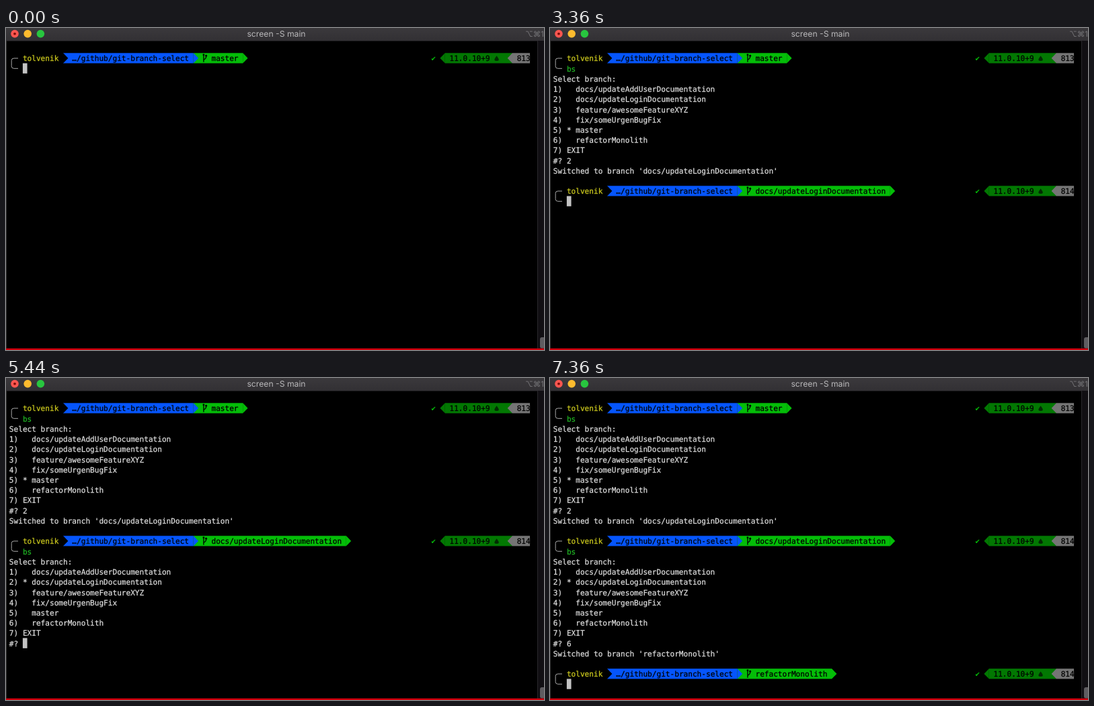
These frames come from a looping animation (800x480 px, 7.44 s). An HTML page with a canvas:

```html
<!DOCTYPE html>
<html lang="en">
<head>
<meta charset="utf-8">
<title>Branch select</title>
<style>
  html, body { margin: 0; width: 100%; height: 100%; overflow: hidden; background: #000; }
  canvas { display: block; width: 800px; height: 480px; }
</style>
</head>
<body>
<canvas id="stage" width="800" height="480"></canvas>
<script>
const ctx = document.getElementById('stage').getContext('2d');
ctx.textRendering = 'geometricPrecision';

const LOOP = 7440;
const CELL = 6.68, LINE = 15.23, LEFT = 4.85, TOP = 37.3;
const BASELINE = 12.1;
const MONO = '11.1px "DejaVu Sans Mono", monospace';
const USER = 'tolvenik';
const BRANCHES = [
  'docs/updateAddUserDocumentation',
  'docs/updateLoginDocumentation',
  'feature/awesomeFeatureXYZ',
  'fix/someUrgenBugFix',
  'master',
  'refactorMonolith'
];
const C = {
  text: '#dcdcdc', yellow: '#cbc81e', typed: '#20b424', blue: '#0555fc',
  green: '#04bd08', dark: '#027802', gray: '#757575', line: '#a8a8a8', cursor: '#c4c4c4'
};

const colX = col => LEFT + col * CELL;
const rowY = row => TOP + row * LINE;

// A hairline stroke gives the text its slightly heavier terminal weight.
function write(str, col, row, color = C.text) {
  const x = colX(col), y = rowY(row) + BASELINE;
  ctx.font = MONO;
  ctx.textAlign = 'left';
  ctx.fillStyle = ctx.strokeStyle = color;
  ctx.lineWidth = 0.25;
  ctx.fillText(str, x, y);
  ctx.strokeText(str, x, y);
}

function poly(color, points) {
  ctx.fillStyle = color;
  ctx.beginPath();
  points.forEach(([x, y]) => ctx.lineTo(x, y));
  ctx.fill();
}

function dot(color, x, y, r) {
  ctx.fillStyle = color;
  ctx.beginPath();
  ctx.arc(x, y, r, 0, Math.PI * 2);
  ctx.fill();
}

function bar(color, from, to, row) {
  ctx.fillStyle = color;
  ctx.fillRect(colX(from), rowY(row), (to - from) * CELL, LINE);
}

// Powerline separator, a little longer than its cell; dir 1 points right, -1 left.
function arrow(color, col, row, dir) {
  const base = colX(dir > 0 ? col : col + 1), y = rowY(row);
  poly(color, [[base, y], [base + dir * (CELL + 0.7), y + LINE / 2], [base, y + LINE]]);
}

function bracket(row) {
  const x = colX(0.5), end = colX(2) - 0.2;
  const y1 = rowY(row) + 7.8, y2 = y1 + LINE;
  ctx.strokeStyle = C.line;
  ctx.lineWidth = 1;
  ctx.beginPath();
  ctx.moveTo(end, y1);
  ctx.arcTo(x, y1, x, y1 + 4, 3.5);
  ctx.lineTo(x, y2 - 4);
  ctx.arcTo(x, y2, end, y2, 3.5);
  ctx.lineTo(end, y2);
  ctx.stroke();
}

function branchIcon(col, row) {
  const x = colX(col) + 1.8, y = rowY(row);
  ctx.strokeStyle = '#000';
  ctx.lineWidth = 1.3;
  ctx.beginPath();
  ctx.moveTo(x, y + 2);
  ctx.lineTo(x, y + 13.5);
  ctx.moveTo(x + 3.7, y + 4);
  ctx.lineTo(x + 3.7, y + 6);
  ctx.quadraticCurveTo(x + 3.5, y + 8.5, x, y + 10);
  ctx.stroke();
  dot('#000', x, y + 2.6, 1.4);
  dot('#000', x + 3.7, y + 4, 1.5);
}

function dropIcon(col, row) {
  const x = colX(col) + 3.3, y = rowY(row) + 4.2;
  ctx.fillStyle = '#032b03';
  ctx.beginPath();
  ctx.moveTo(x, y);
  ctx.quadraticCurveTo(x + 5.5, y + 6.5, x + 1.5, y + 7.5);
  ctx.lineTo(x - 1.5, y + 7.5);
  ctx.quadraticCurveTo(x - 5.5, y + 6.5, x, y);
  ctx.fill();
}

function prompt(row, branch, count) {
  bracket(row);
  write(USER, 3, row, C.yellow);

  const end = 46 + branch.length;
  bar(C.blue, 12, 41, row);
  arrow('#000', 12, row, 1);
  bar(C.green, 41, end, row);
  arrow(C.blue, 41, row, 1);
  arrow(C.green, end, row, 1);
  write('…/github/git-branch-select', 14, row, '#000');
  branchIcon(43, row);
  write(branch, 45, row, '#000');

  ctx.font = '9.5px "DejaVu Sans", sans-serif';
  ctx.fillStyle = C.green;
  ctx.fillText('✔', colX(94) - 1, rowY(row) + 11.7);
  arrow(C.dark, 96, row, -1);
  bar(C.dark, 97, 112, row);
  arrow(C.gray, 111, row, -1);
  bar(C.gray, 112, 115.9, row);
  write('11.0.10+9', 98, row, '#000');
  dropIcon(108, row);
  write(String(count), 113, row, '#000');
}

function menu(row, current) {
  write('Select branch:', 0, row);
  BRANCHES.forEach((name, i) => {
    write(`${i + 1}) ${name === current ? '*' : ' '} ${name}`, 0, row + i + 1);
  });
  write('7) EXIT', 0, row + 7);
  write('#?', 0, row + 8);
}

const type = (str, col, row, color) => () => write(str, col, row, color);
const switched = (row, name) => () => write(`Switched to branch '${name}'`, 0, row);
const none = () => {};

// [time, what appears, cursor column, cursor row]
const steps = [
  [0, () => prompt(0, 'master', 813), 3, 1],
  [400, type('b', 3, 1, C.typed), 4, 1],
  [520, type('s', 4, 1, C.typed), 5, 1],
  [720, none, 0, 2],
  [840, () => menu(2, 'master'), 3, 10],
  [2000, type('2', 3, 10), 4, 10],
  [2200, none, 0, 11],
  [2240, switched(11, BRANCHES[1]), 0, 12],
  [2720, () => prompt(13, BRANCHES[1], 814), 3, 14],
  [3520, type('b', 3, 14, C.typed), 4, 14],
  [3640, type('s', 4, 14, C.typed), 5, 14],
  [3840, none, 0, 15],
  [3960, () => menu(15, BRANCHES[1]), 3, 23],
  [5840, type('6', 3, 23), 4, 23],
  [6040, none, 0, 24],
  [6080, switched(24, BRANCHES[5]), 0, 25],
  [6520, () => prompt(26, BRANCHES[5], 814), 3, 27]
];

function drawWindow() {
  ctx.fillStyle = '#000';
  ctx.fillRect(0, 0, 800, 480);

  const shade = ctx.createLinearGradient(0, 0, 0, 19);
  shade.addColorStop(0, '#3b393c');
  shade.addColorStop(1, '#323034');
  ctx.fillStyle = shade;
  ctx.fillRect(0, 0, 800, 19.4);

  dot('#fc5650', 13, 8.6, 5.8);
  dot('#7c0c08', 13, 8.6, 1.9);
  dot('#fdbb2e', 32.2, 8.6, 5.8);
  dot('#28c63f', 51.4, 8.6, 5.8);

  ctx.textAlign = 'center';
  ctx.font = '12.2px Inter, sans-serif';
  ctx.fillStyle = '#b9b8ba';
  ctx.fillText('screen -S main', 402, 13);
  ctx.textAlign = 'left';
  ctx.font = '11.5px Inter, "DejaVu Sans", sans-serif';
  ctx.fillStyle = '#757477';
  ctx.fillText('⌥⌘1', 772, 12.5);

  ctx.fillStyle = '#343434';
  ctx.fillRect(0, 19, 1, 459);
  ctx.fillStyle = '#110f13';
  ctx.fillRect(791, 19, 9, 459);
  ctx.fillStyle = '#29272b';
  ctx.fillRect(790, 19, 1, 459);
  ctx.fillStyle = '#5e5c60';
  ctx.beginPath();
  ctx.roundRect(794, 461, 9, 16.5, 3);
  ctx.fill();
  ctx.fillStyle = '#d2000c';
  ctx.fillRect(0, 477.6, 800, 2.4);
}

function draw(t) {
  drawWindow();
  const shown = steps.filter(([time]) => time <= t);
  shown.forEach(([, show]) => show());
  const [, , col, row] = shown[shown.length - 1];
  ctx.fillStyle = C.cursor;
  ctx.fillRect(colX(col), rowY(row), CELL, LINE);
}

const start = performance.now();
function tick() {
  draw((performance.now() - start) % LOOP);
  requestAnimationFrame(tick);
}
tick();
</script>
</body>
</html>
```
